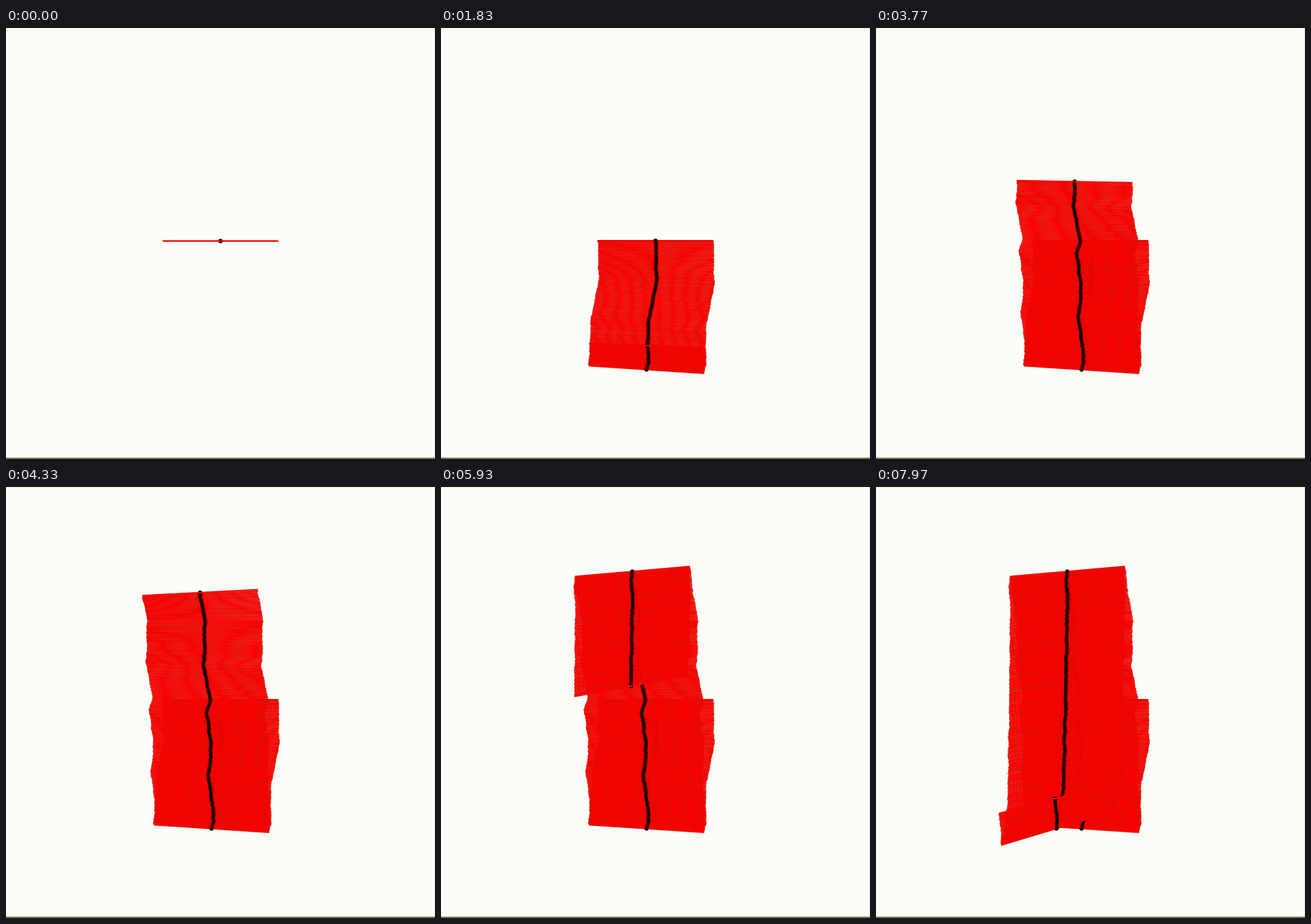
These frames come from a looping animation (600 by 604 pixels, 8 s). An HTML page with a canvas:

```html
<!DOCTYPE html>
<html lang="en">
<head>
<meta charset="utf-8">
<title>Swaying rod trail</title>
<style>
  html, body { margin: 0; width: 100%; height: 100%; overflow: hidden; background: #fdfdf8; }
  canvas { display: block; width: 600px; height: 604px; }
</style>
</head>
<body>
<canvas id="stage" width="600" height="604"></canvas>
<script>
const ctx = document.getElementById('stage').getContext('2d');
const LOOP = 8000, HALF = 80, MID = 298.5, SWING = 180;
const LEG = 182, START_DELAY = 2; // in steps, two steps per picture

// Key poses of the rod: step, centre x, tilt in degrees
const poses = [
  [0, 300, 0], [30, 301.5, 2.8], [60, 290.5, 3], [92, 287, 3.8],
  [100, 291, 3], [128, 283.5, 2.9], [152, 287, 2.4], [176, 281, 1.3],
  [185, 286, 1.6], [208, 277, 2.2], [240, 278, 0], [275, 267, -5],
  [320, 267.5, -8.6], [432, 262.5, -14], [457, 252.5, -16.8], [480, 250.5, -14.6]
];

const mix = (a, b, f) => a + (b - a) * f;

function poseAt(k) {
  const next = Math.max(1, poses.findIndex(pose => pose[0] >= k));
  const [k0, x0, tilt0] = poses[next - 1], [k1, x1, tilt1] = poses[next];
  const f = (k - k0) / (k1 - k0);
  return { x: mix(x0, x1, f), tilt: mix(tilt0, tilt1, f) };
}

// Repeatable noise in -1..1, zero at the first step
function noise(k, seed) {
  if (k === 0) return 0;
  const v = Math.sin(k * 12.9898 + seed * 78.233) * 43758.5453;
  return (v - Math.floor(v)) * 2 - 1;
}

function wobble(k, span, seed) {
  const i = Math.floor(k / span);
  return mix(noise(i, seed), noise(i + 1, seed), k / span - i);
}

function height(k) {
  const phase = (Math.max(0, k - START_DELAY) / LEG + 0.5) % 2;
  return MID - SWING + 2 * SWING * (phase < 1 ? phase : 2 - phase);
}

function strokeRod(x, y, dx, dy, color, width) {
  ctx.strokeStyle = color;
  ctx.lineWidth = width;
  ctx.beginPath();
  ctx.moveTo(x - dx, y - dy);
  ctx.lineTo(x + dx, y + dy);
  ctx.stroke();
}

function drawStep(k) {
  const pose = poseAt(k);
  const x = pose.x + wobble(k, 6, 1) + 0.5 * noise(k, 2);
  const y = height(k);
  const angle = (pose.tilt + 0.3 * wobble(k, 8, 3)) * Math.PI / 180;
  const dx = HALF * Math.cos(angle), dy = HALF * Math.sin(angle);
  ctx.fillStyle = '#000';
  ctx.beginPath();
  ctx.arc(x, y, 3.1, 0, 2 * Math.PI);
  ctx.fill();
  // A faint dark fringe gives the seams between neighbouring rods their tone
  strokeRod(x, y, dx, dy, 'rgba(80, 50, 0, 0.35)', 2.7);
  strokeRod(x, y, dx, dy, '#f00', 2);
}

function fillBox(color, x, y, w, h) {
  ctx.fillStyle = color;
  ctx.fillRect(x, y, w, h);
}

function clearStage() {
  fillBox('#fdfdf8', 0, 0, 600, 604);
  fillBox('#fafabe', 0, 0, 600, 1);
  fillBox('#e6e6dc', 599, 0, 1, 604);
  fillBox('#80805a', 0, 602, 600, 2);
  ctx.lineCap = 'round';
}

let drawn = Infinity;
function render(t) {
  const hundredths = Math.floor(t / 10);
  const last = 2 * Math.floor((hundredths + 0.4) * 0.3);
  if (last < drawn) {
    clearStage();
    drawn = -1;
  }
  while (drawn < last) drawStep(++drawn);
}

let begin = null;
function tick(now) {
  if (begin === null) begin = now;
  render(Math.max(0, now - begin) % LOOP);
  requestAnimationFrame(tick);
}
render(0);
requestAnimationFrame(tick);
</script>
</body>
</html>
```
